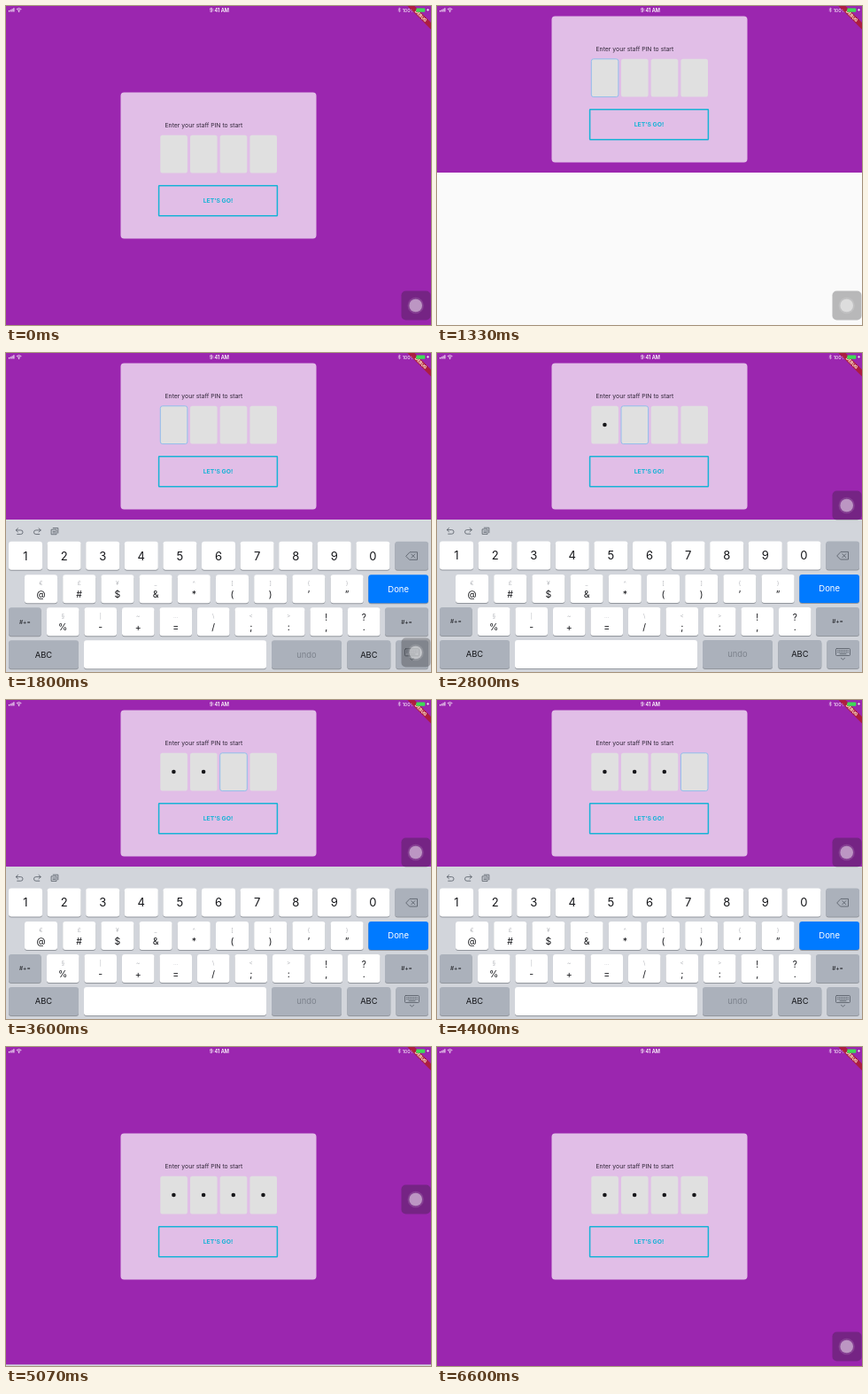
Animation of 480x360 px, one loop 6870 ms. Source, as an HTML page:

```html
<!DOCTYPE html>
<html lang="en">
<head>
<meta charset="utf-8">
<title>Staff PIN</title>
<style>
  html, body { margin: 0; height: 100%; overflow: hidden; background: #9b26af; }
  svg { display: block; width: 100vw; height: 100vh; font-family: Inter, sans-serif; }
  text { text-anchor: middle; }
  .line { fill: none; stroke: #555b65; stroke-width: .8; stroke-linecap: round; stroke-linejoin: round; }
</style>
</head>
<body>
<svg viewBox="0 0 480 360">
  <rect width="480" height="360" fill="#9b26af"/>
  <rect id="panel" y="188" width="480" height="172" fill="#fafafa"/>

  <g id="card">
    <rect x="129.5" y="97.5" width="221" height="165" rx="4" fill="#e1bee7"/>
    <text x="179.5" y="136.8" font-size="6.85" fill="#302638" style="text-anchor:start">Enter your staff PIN to start</text>
    <g id="pins"></g>
    <rect x="172.6" y="202.7" width="133.8" height="34" rx=".5" fill="none" stroke="#18b3d6" stroke-width="1.5"/>
    <text x="239.5" y="222" font-size="6.8" font-weight="700" fill="#18b3d6">LET'S GO!</text>
  </g>

  <g id="keyboard">
    <rect y="188" width="480" height="172" fill="#d2d5db"/>
    <g id="keys"></g>
    <g class="line">
      <path id="undo" d="M13.5 197.5l-2.3 2.1 2.3 2.1M11.4 199.6h5.3a2.3 2.3 0 0 1 0 4.6h-4"/>
      <use href="#undo" transform="matrix(-1 0 0 1 50.5 0)"/>
      <path d="M53.2 197.2h5.6v5.6M51.5 198.9h5.5v5.5h-5.5zM53 201h2.5M53 202.6h2.5"/>
      <path d="M452 228.7l4-4.3h8.5v8.6h-8.5zM457.8 226.7l4 4M461.8 226.7l-4 4"/>
      <rect x="450.5" y="333.5" width="16" height="8" rx="1"/>
      <path d="M452.5 335.7h12M452.5 337.6h12" stroke-dasharray=".6 1.3"/>
      <path d="M455 339.6h7M456.5 344.4l2 1.6 2-1.6"/>
    </g>
  </g>

  <g fill="#fff">
    <path d="M3 5h1v1.5h-1zM4.8 4.2h1v2.3h-1zM6.6 3.3h1v3.2h-1zM8.4 2.3h1v4.2h-1z"/>
    <path d="M11.8 3.7q2.8-2.3 5.6 0M13 5q1.6-1.2 3.2 0" fill="none" stroke="#fff" stroke-width=".8"/>
    <circle cx="14.6" cy="6.2" r=".7"/>
    <text x="241" y="6.6" font-size="5.6" font-weight="600">9:41 AM</text>
    <path d="M443 3.2l2.4 2.4-1.2 1.3v-5l1.2 1.3-2.4 2.4" fill="none" stroke="#fff" stroke-width=".5"/>
    <text x="454.8" y="6.6" font-size="5.4">100%</text>
    <path d="M475 4.4h3M476.5 3v2.8" stroke="#fff" stroke-width=".7"/>
  </g>
  <g transform="translate(468.7 11.3) rotate(45)">
    <rect x="-25" y="-2.8" width="50" height="5.6" fill="#b01c2e" opacity=".85"/>
    <text y="1.7" font-size="4.8" font-weight="800" fill="#ffeccb">DEBUG</text>
  </g>
  <rect x="463.3" y="2.4" width="10" height="4.4" rx="1" fill="#3ddc56"/>

  <g id="assist">
    <rect x="446.5" y="-16.5" width="33" height="33" rx="5" fill="#1e1e23" opacity=".3"/>
    <g fill="#fff">
      <circle cx="462.7" r="9.2" opacity=".13"/>
      <circle cx="462.7" r="7.3" opacity=".45"/>
    </g>
  </g>
</svg>
<script>
const LOOP = 6870;
const OPEN = 1330, CLOSE = 4700;
const DOTS = [2670, 3400, 4100, CLOSE];
const PANEL_HEIGHT = 172;
const $ = id => document.getElementById(id);

function add(parent, tag, attrs, label = '') {
  const el = document.createElementNS('http://www.w3.org/2000/svg', tag);
  for (const name in attrs) el.setAttribute(name, attrs[name]);
  el.textContent = label;
  return parent.appendChild(el);
}

function label(str, x, y, size, fill = '#15161a') {
  add($('keys'), 'text', { x, y, 'font-size': size, fill }, str);
}

function key(x, y, width, fill = '#fff') {
  const shape = { x, width, height: 32, rx: 3 };
  add($('keys'), 'rect', { ...shape, y: y + 1, fill: '#92969d' });
  add($('keys'), 'rect', { ...shape, y, fill });
}

function wideKey(x, y, width, str, size, fill, ink) {
  key(x, y, width, fill);
  label(str, x + width / 2, y + 16 + size * .36, size, ink);
}

function symbolRow(x, y, pitch, width, upper, lower) {
  [...lower].forEach((main, i) => {
    const left = x + i * pitch, center = left + width / 2, alt = upper[i];
    const punctuation = '!?'.includes(alt);
    key(left, y, width);
    label(alt, center, y + (punctuation ? 15 : 11.5), punctuation ? 10 : 6.5, punctuation ? '#15161a' : '#b4b6bb');
    label(main, center, y + 25.5, 10.5);
  });
}

const GRAY = '#abb1bb';
[...'1234567890'].forEach((digit, i) => wideKey(3 + i * 43.6, 212.5, 38, digit, 13));
key(439.3, 212.5, 37.7, GRAY);
symbolRow(21, 250, 43.2, 37, '€£¥_^[]{}', '@#$&*()’”');
wideKey(409.3, 250, 67.7, 'Done', 9.5, '#007aff', '#fff');
wideKey(3, 287, 36.7, '#+=', 6.5, GRAY);
symbolRow(46, 287, 42.5, 36.5, '§|~…\\<>!?', '%-+=/;:,.');
wideKey(428, 287, 49, '#+=', 6.5, GRAY);
wideKey(3, 324, 79, 'ABC', 9.3, GRAY);
key(88, 324, 206);
wideKey(300, 324, 79, 'undo', 9.3, GRAY, '#7d838d');
wideKey(385.3, 324, 49, 'ABC', 9.3, GRAY);
key(440.3, 324, 36.7, GRAY);

const pins = DOTS.map((time, i) => {
  const x = 174.3 + i * 33.7;
  return {
    time,
    box: add($('pins'), 'rect', { x, y: 145.8, width: 30.6, height: 42.8, rx: 2.5, fill: '#e0e0e0' }),
    dot: add($('pins'), 'circle', { cx: x + 15.1, cy: 167, r: 2.3, fill: '#17171a' }),
  };
});

// Critically damped spring from 0 to 1
function spring(ms) {
  const x = Math.max(0, ms) * .018;
  return 1 - (1 + x) * Math.exp(-x);
}

function glide(t, start, duration) {
  const p = Math.min(1, Math.max(0, (t - start) / duration));
  return p * p * (3 - 2 * p);
}

function moveY(id, y) {
  $(id).setAttribute('transform', `translate(0 ${y})`);
}

function draw(t) {
  const open = t >= OPEN && t < CLOSE;
  const shown = t < CLOSE ? spring(t - OPEN) : 1 - spring(t - CLOSE);
  $('panel').style.display = open ? '' : 'none';
  moveY('card', open ? -PANEL_HEIGHT / 2 : 0);
  moveY('keyboard', PANEL_HEIGHT * (1 - shown));
  moveY('assist', 338 - 166 * (glide(t, 1830, 330) - glide(t, 5150, 330)));

  const focused = open ? pins.findIndex(pin => t < pin.time) : -1;
  pins.forEach(({ time, box, dot }, i) => {
    dot.style.display = t >= time ? '' : 'none';
    box.setAttribute('stroke', i === focused ? '#92bdec' : 'none');
  });
}

function tick() {
  draw(performance.now() % LOOP);
  requestAnimationFrame(tick);
}
tick();
</script>
</body>
</html>
```
